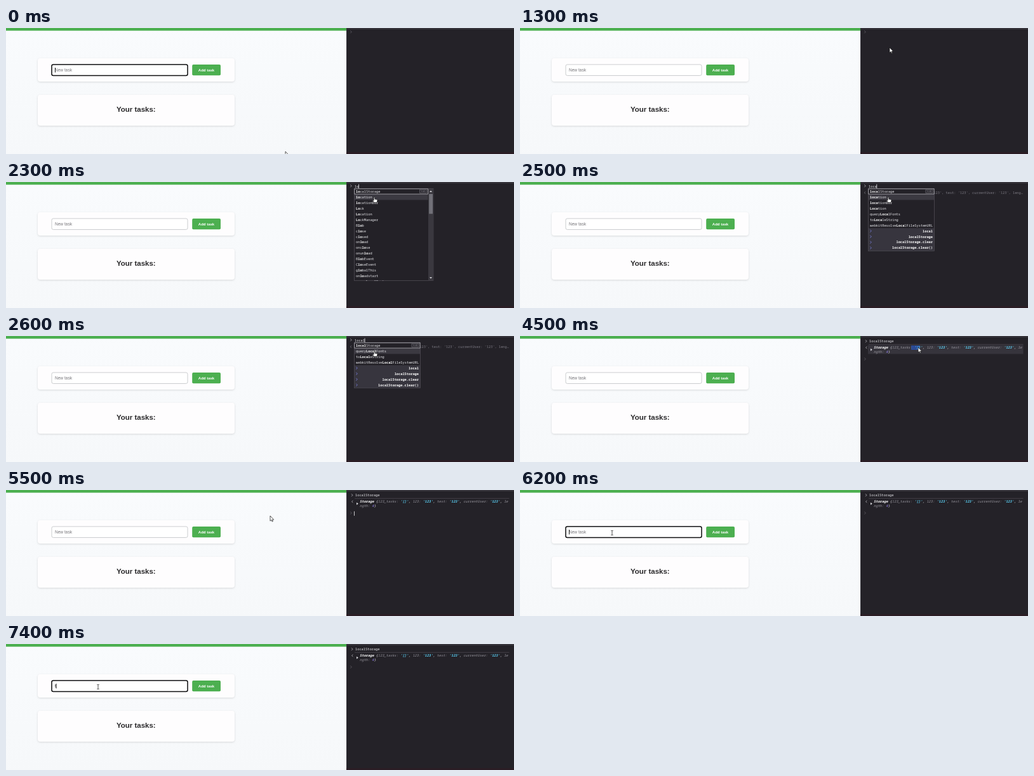
An HTML page for the animation above (8000 ms loop, 800 px wide and 200 px high).

```html
<!DOCTYPE html>
<html lang="en">
<head>
<meta charset="utf-8">
<title>Task list and console</title>
<style>
  html, body { margin: 0; width: 100%; height: 100%; overflow: hidden; }
  svg { display: block; width: 800px; height: 200px; }
  text { white-space: pre; font-family: "Liberation Sans", Arial, sans-serif; }
  .mono text { font: 5.33px "Noto Sans Mono", "DejaVu Sans Mono", monospace; fill: #e8e8ec; }
  .mono .bold { font-weight: 700; fill: #fff; }
  .mono .result { font-style: italic; }
  .key { fill: #9b99a1; }
  .str { fill: #5cd5fb; font-weight: 700; }
  .num { fill: #a08cff; }
  .mono .dim { fill: #7d7b84; }
  .chev { fill: none; stroke-width: .8; }
  .card { fill: #fefdfe; filter: drop-shadow(0 1.5px 1.5px rgba(0, 0, 0, .13)); }
</style>
</head>
<body>
<svg viewBox="0 0 800 200" xmlns="http://www.w3.org/2000/svg">
  <defs>
    <linearGradient id="page" x2="0" y2="1">
      <stop stop-color="#f9fbfd"/><stop offset="1" stop-color="#f6f8fa"/>
    </linearGradient>
    <clipPath id="popupClip"><rect x="548" y="10" width="125.5" height="147"/></clipPath>
  </defs>

  <rect width="537" height="200" fill="url(#page)"/>
  <rect width="536" height="4.3" fill="#4caf50"/>
  <rect class="card" x="50" y="48" width="310" height="37" rx="4"/>
  <rect class="card" x="50" y="106" width="310" height="49" rx="4"/>
  <rect id="field" x="72" y="58" width="214" height="17.5" rx="2.5" fill="#fff"/>
  <text id="fieldText" x="77" y="69" font-size="6.55"></text>
  <rect id="fieldCaret" y="63" width=".9" height="7.5" fill="#000"/>
  <rect x="293.2" y="58" width="44.8" height="17.2" rx="2" fill="#4caf50"/>
  <text x="315.5" y="69" font-size="6" font-weight="700" fill="#fff" text-anchor="middle">Add task</text>
  <text x="204.8" y="133" font-size="11.5" font-weight="700" fill="#2b2a2c" text-anchor="middle">Your tasks:</text>

  <g class="mono">
    <rect x="536" width="264" height="200" fill="#242228"/>
    <rect x="536" y=".6" width="264" height="1" fill="#4b4950"/>
    <rect x="536" width=".7" height="200" fill="#3b3940"/>
    <rect x="536" y="197" width="264" height="3" fill="#2b1d25"/>
    <g id="done">
      <rect id="rowHover" x="548" y="14.5" width="244.5" height="14" fill="#36343c"/>
      <rect id="mark" x="616" y="15" height="7" fill="#2b4a94"/>
      <path d="M549 13.3H792.5" stroke="#4f4d55" stroke-width=".7"/>
      <path class="chev" d="M544 6.2l2 2-2 2" stroke="#b9b8be"/>
      <text x="550" y="10">localStorage</text>
      <path class="chev" d="M546.3 16.6l-1.7 1.8 1.7 1.8" stroke="#b9b8be"/>
      <path d="M552 19.8v4l2.8-2z" fill="#d5d4d9"/>
      <text class="result" x="557" y="20.3" id="line1"></text>
      <text class="result" x="557" y="27" id="line2"></text>
    </g>
    <path class="chev" id="prompt"/>
    <text id="typed" x="549" y="8.6"></text>
    <g id="eager">
      <path class="chev" d="M544 15.2l-1.7 1.8 1.7 1.8" stroke="#77757e"/>
      <text class="dim" x="549" y="18.8" id="eagerText"></text>
    </g>
    <rect id="caret" width=".8" fill="#f0f0f3"/>
    <g id="popup" clip-path="url(#popupClip)"></g>
  </g>

  <g id="cursor" stroke-linejoin="round">
    <path id="arrow" d="M0 0V8.2L1.9 6.5 3.1 9.2 4.4 8.6 3.2 6.1H5.7Z" fill="#fff" stroke="#111" stroke-width=".7"/>
    <path id="hand" d="M-.8 .4Q0-.6 .8 .4V3.2L4.4 4Q5 4.3 4.8 5.4L4 8.6H-.2L-2.6 5.4Q-2.6 4.2-.8 5.4Z" fill="#fff" stroke="#111" stroke-width=".6"/>
    <path id="beam" d="M-1.7-3.6H-.4L0-3.2 .4-3.6H1.7M0-3.2V3.2M-1.7 3.6H-.4L0 3.2 .4 3.6H1.7" fill="none" stroke="#222" stroke-width=".8"/>
  </g>
</svg>
<script>
const LOOP = 8000, STEP = 100, CHAR = 3.2, ROW = 8.95;
const $ = id => document.getElementById(id);
const show = (id, on) => $(id).setAttribute("display", on ? "inline" : "none");
const set = (id, attrs) => {
  for (const key in attrs) $(id).setAttribute(key, attrs[key]);
};
const within = (t, ...spans) => spans.some(([from, to]) => t >= from && t < to);
const span = (cls, text) => `<tspan class="${cls}">${text}</tspan>`;

// time, x, y of the pointer
const PATH = [
  [500, 440, 196], [700, 458, 172], [900, 512, 108], [1100, 566, 48], [1200, 580, 33],
  [1300, 582, 31], [1400, 582, 31], [1600, 580, 24], [3800, 580, 24], [4000, 600, 20],
  [4200, 616, 18], [4300, 616, 18], [4500, 627, 18], [4600, 632, 18], [4800, 632, 18],
  [5000, 606, 33], [5200, 530, 42], [5500, 416, 41], [5700, 400, 42], [5900, 290, 56],
  [6100, 160, 67], [6200, 145, 68]
];

const TYPING = [[2200, "l"], [2300, "lo"], [2400, "loc"], [2500, "loca"], [2600, "local"],
  [2700, "localSt"], [2800, "localStorage"]];

const NAMES = ("localStorage location locationbar Lock Location LockManager Blob close closed " +
  "onload onclose onunload BlobEvent CloseEvent globalThis onloadstart queryLocalFonts " +
  "toLocaleString webkitResolveLocalFileSystemURL").split(" ");
const HISTORY = ["local", "localStorage", "localStorage.clear", "localStorage.clear()"];

const STORE = [["123_tasks", "[]"], ["123", "123"], ["test", "123"], ["currentUser", "123"]];

$("line1").innerHTML = span("bold", "Storage ") + "{" +
  STORE.map(([k, v]) => span("key", k + ": ") + span("str", `'${v}'`) + ", ").join("") +
  span("key", "le");
$("line2").innerHTML = span("key", "ngth: ") + span("num", "4") + "}";
$("eagerText").textContent =
  "Storage {" + STORE.map(([k, v]) => `${k}: '${v}', `).join("") + "leng…";

function pointerAt(t) {
  const i = PATH.findIndex(p => p[0] > t);
  if (i === 0) return PATH[0].slice(1);
  if (i < 0) return PATH[PATH.length - 1].slice(1);
  const [t0, x0, y0] = PATH[i - 1], [t1, x1, y1] = PATH[i];
  const k = (t - t0) / (t1 - t0);
  return [x0 + (x1 - x0) * k, y0 + (y1 - y0) * k];
}

function box(x, y, w, h, fill, stroke = "none") {
  return `<rect x="${x}" y="${y}" width="${w}" height="${h}" fill="${fill}" stroke="${stroke}" stroke-width=".7"/>`;
}

function popup(query) {
  const match = s => s.toLowerCase().includes(query.toLowerCase());
  const past = query.length > 2 ? HISTORY.filter(match) : [];
  const names = NAMES.filter(match), rows = [...names, ...past];
  const scroll = rows.length > 16;
  const height = scroll ? 146 : rows.length * ROW + .6;
  const width = scroll ? 116.5 : 104;
  const top = i => 10.6 + i * ROW;
  const bold = s => s.replace(new RegExp(query, "i"), m => span("bold", m));

  let out = box(548.4, 10.4, scroll ? 124.8 : 104, height, "#232127", "#55535b");
  if (past.length) out += box(549, top(names.length), width - 1, past.length * ROW, "#37353e");
  out += box(549, top(1), width - 1, ROW, "#3b3941");
  rows.forEach((name, i) => {
    const y = top(i) + 6.3;
    if (i < names.length) {
      out += `<text x="551" y="${y}">${bold(name)}</text>`;
    } else {
      out += `<text class="bold" x="650" y="${y}" text-anchor="end">${name}</text>` +
        `<path class="chev" d="M551.3 ${y - 3.8}l2 2-2 2" stroke="#7d83e8"/>`;
    }
  });
  out += box(548.8, 10.9, width - .8, 8.2, "none", "#c9c8ce");
  const tab = 548 + width - 7.6;
  out += box(tab - 5.5, 12.3, 11, 5.3, "#2d2b32", "#68666e") +
    `<text x="${tab}" y="16.4" text-anchor="middle" class="dim" style="font-size:4.2px">tab</text>`;
  if (scroll) {
    out += box(665, 11, 8, 145.4, "#3a383f") + box(666.2, 19, 5.8, 31.5, "#717078") +
      `<path d="M667 16h4l-2-2.6zM667 151h4l-2 2.6z" fill="#d0cfd4"/>`;
  }
  return out;
}

function draw(t) {
  const focused = t < 1200 || t >= 6200;
  set("field", { stroke: focused ? "#0c0c0e" : "#c6c8ca", "stroke-width": focused ? 1.5 : .9 });
  $("fieldText").textContent = t < 7400 ? "New task" : "t";
  set("fieldText", { fill: t < 7400 ? "#77767a" : "#222" });
  set("fieldCaret", { x: t < 7400 ? 77 : 78.6 });
  show("fieldCaret", within(t, [0, 600], [1100, 1200], [6200, LOOP]));

  const entered = t >= 3000;
  const typed = entered ? "" : (TYPING.filter(s => s[0] <= t).pop() || [0, ""])[1];
  show("done", entered);
  show("rowHover", within(t, [3900, 5000]));
  show("mark", within(t, [4400, 4700]));
  set("mark", { width: t < 4500 ? 6 : t < 4600 ? 14 : 18 });
  $("typed").textContent = typed;
  show("eager", within(t, [2500, 3000]));

  set("prompt", {
    d: entered ? "M542.3 34.5l2 2-2 2" : "M542.3 4.2l2 2-2 2",
    stroke: typed ? "#b9b8be" : "#66646d"
  });
  set("caret", {
    x: entered ? 548.1 : 548.6 + typed.length * CHAR,
    y: entered ? 33.8 : 3.6, height: entered ? 7 : 6.6
  });
  show("caret", within(t, [1400, 2000], [2200, 3400], [3900, 4400], [4900, 5900]));

  const open = typed.length > 1;
  show("popup", open);
  $("popup").innerHTML = open ? popup(typed) : "";

  const [x, y] = pointerAt(t);
  const overField = x > 72 && x < 286 && y > 58 && y < 76;
  const hand = within(t, [2300, 3000]);
  set("cursor", { transform: `translate(${x} ${y})` });
  show("hand", hand);
  show("beam", overField);
  show("arrow", !hand && !overField);
}

const start = performance.now();
let last = -1;
function tick() {
  const t = Math.floor(((performance.now() - start) % LOOP) / STEP) * STEP;
  if (t !== last) draw(last = t);
  requestAnimationFrame(tick);
}
tick();
</script>
</body>
</html>
```
